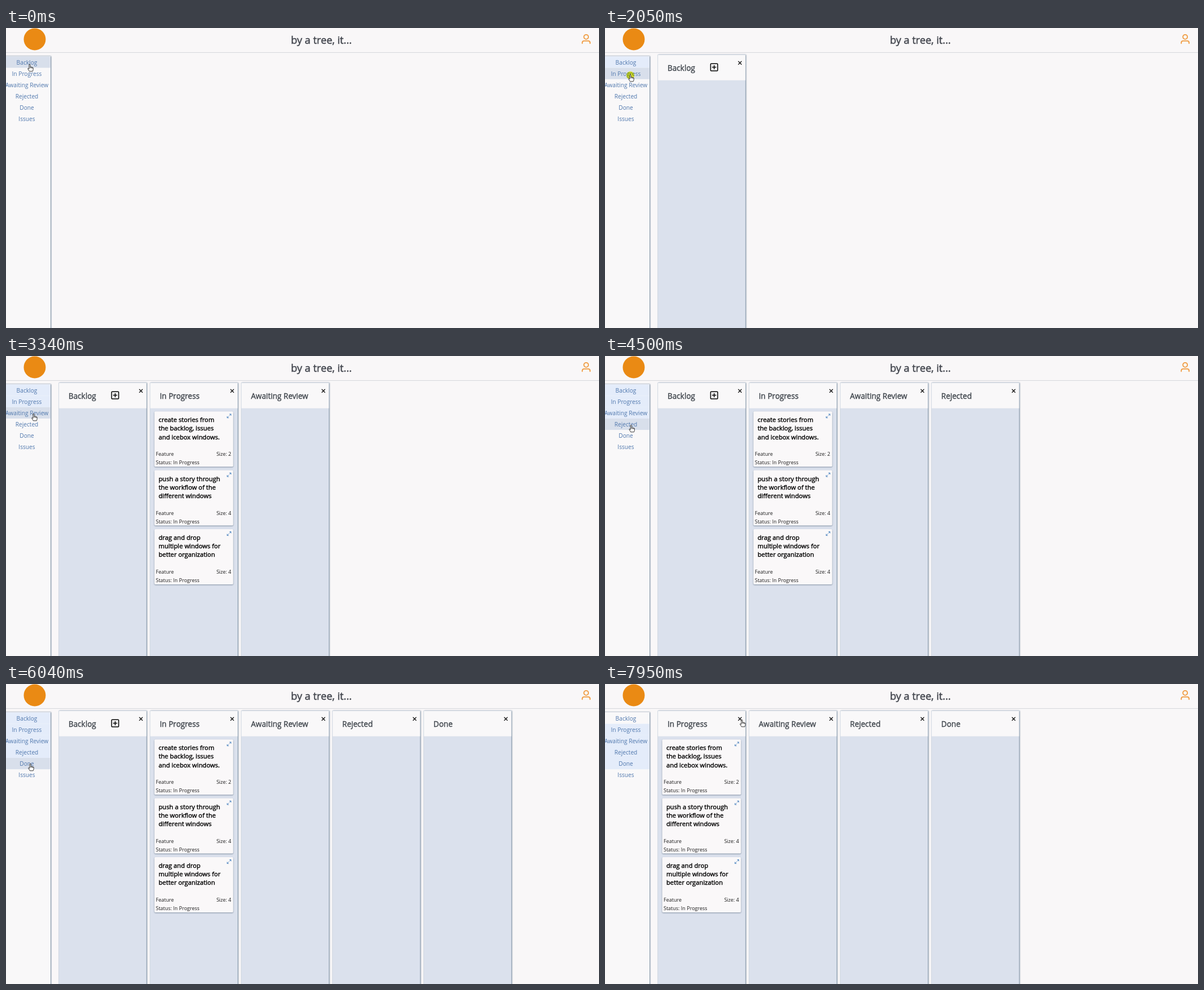
Write an HTML page that moves like this. It is 1053 px wide and 532 px high and loops after 8000 ms.

```html
<!DOCTYPE html>
<html lang="en">
<head>
<meta charset="utf-8">
<title>Story board</title>
<style>
  html, body { margin: 0; width: 100%; height: 100%; overflow: hidden; background: #f9f7f8; }
  svg { display: block; width: 1053px; height: 532px; font-family: "Open Sans", "Noto Sans", sans-serif; }
  .nav { font-size: 10.2px; fill: #4f77ad; text-anchor: middle; }
  .title { font-size: 18.2px; fill: #454850; stroke: #454850; stroke-width: .55; text-anchor: middle; }
  .heading { font-size: 13.6px; fill: #41474e; stroke: #41474e; stroke-width: .4; }
  .story { font-size: 11.22px; stroke: #000; stroke-width: .4; }
  .meta { font-size: 9px; fill: #1c1c1c; }
  .end { text-anchor: end; }
  .panel { filter: drop-shadow(1px 0 .8px #60788f); }
  .card { fill: #faf8f9; filter: drop-shadow(.5px 1px .8px #8290a2); }
  .line { fill: none; stroke-linecap: round; stroke-linejoin: round; }
</style>
</head>
<body>
<svg id="stage" viewBox="0 0 1053 532"></svg>
<script>
const LOOP = 8000, STEP = 70, ROW = 20.16, PITCH = 162;
const stage = document.getElementById('stage');

function add(parent, tag, attrs, text) {
  const node = document.createElementNS('http://www.w3.org/2000/svg', tag);
  for (const key in attrs) node.setAttribute(key, attrs[key]);
  if (text) node.textContent = text;
  parent.appendChild(node);
  return node;
}
const rect = (parent, x, y, width, height, fill, more) =>
  add(parent, 'rect', { x, y, width, height, fill, ...more });
const label = (parent, x, y, cls, text) => add(parent, 'text', { x, y, class: cls }, text);
const line = (parent, d, stroke, width) =>
  add(parent, 'path', { d, stroke, 'stroke-width': width, class: 'line' });

// Open and close times of each column
const columns = [
  { name: 'Backlog', open: 1220, close: 7740 },
  { name: 'In Progress', open: 2120 },
  { name: 'Awaiting Review', open: 3340 },
  { name: 'Rejected', open: 4290 },
  { name: 'Done', open: 5960 },
  { name: 'Issues', open: Infinity }
];
const stories = [
  [2, 'create stories from', 'the backlog, issues', 'and icebox windows.'],
  [4, 'push a story through', 'the workflow of the', 'different windows'],
  [4, 'drag and drop', 'multiple windows for', 'better organization']
];
const clicks = [1150, 2050, 3270, 4220, 5880, 7670];

// Pointer tip: time, x, y
const path = [
  [0, 42, 64], [1220, 42, 64], [1780, 45, 82], [2320, 45, 82], [2810, 49, 102],
  [3539, 49, 102], [3540, 50, 102], [3730, 50, 102], [4150, 44, 122],
  [4290, 44, 122], [4570, 47, 122], [4850, 65, 130], [5120, 60, 138],
  [5390, 60, 139], [5630, 103, 131], [5880, 43, 141], [6040, 43, 141],
  [6230, 62, 130], [7050, 244, 60], [7120, 244, 61], [7340, 243, 63], [LOOP, 243, 63]
];

function drawHeader() {
  line(stage, 'M0 43.5H1053', '#d6d7dc', 1);
  add(stage, 'circle', { cx: 51, cy: 20, r: 19.5, fill: '#ea8a14' });
  label(stage, 560, 28, 'title', 'by a tree, it...');
  add(stage, 'circle', { cx: 1030.2, cy: 15.8, r: 4, class: 'line', stroke: '#f09a3e', 'stroke-width': 1.8 });
  line(stage, 'M1023.3 27.3v-1.2q0-3.2 3.4-3.2h7q3.4 0 3.4 3.2v1.2', '#f09a3e', 1.8);
}

function drawNav() {
  rect(stage, -5, 50, 84, 500, '#f9f8f9', { class: 'panel' });
  columns.forEach((column, i) => {
    column.row = rect(stage, 0, 50.4 + i * ROW, 78.6, ROW, 'none');
    label(stage, 37, 64.5 + i * ROW, 'nav', column.name);
  });
}

function drawCard(parent, [size, ...lines], y) {
  rect(parent, 169.5, y, 140, 98, '', { class: 'card', rx: 2 });
  lines.forEach((text, i) => label(parent, 177, y + 19 + i * 15.1, 'story', text));
  label(parent, 172, y + 79, 'meta', 'Feature');
  label(parent, 306, y + 79, 'meta end', 'Size: ' + size);
  label(parent, 172, y + 94, 'meta', 'Status: In Progress');
  line(parent, `M302.8 ${y + 7.3}l2.6-2.6m-2.3 0h2.4v2.4M301.4 ${y + 8.7}l-2.6 2.6m0-2.3v2.4h2.4`, '#4f86c0', 1);
}

function drawColumn(column, i) {
  const group = column.group = add(stage, 'g', {});
  const x = 94;
  rect(group, x, 47.5, 155.3, 500, '#dbe1ed', { class: 'panel' });
  rect(group, x, 47.5, 155.3, 45.2, '#f9f8f9');
  line(group, `M${x - .3} 540V47.5H${x + 155}`, '#c9d3de', .8);
  label(group, x + 17, 76, 'heading', column.name);
  line(group, 'M237 59.2l5.2 5.2m0-5.2l-5.2 5.2', '#1a1a1a', 1.4);
  if (i === 0) {
    rect(group, 187.5, 63.3, 12.6, 12.6, 'none', { rx: 1.2, stroke: '#000', 'stroke-width': 1.5 });
    line(group, 'M190.6 69.6h6.4m-3.2-3.2v6.4', '#000', 1.5);
  }
  if (i === 1) {
    const cards = add(group, 'g', { transform: 'translate(-68 0)' });
    stories.forEach((story, k) => drawCard(cards, story, 98.3 + k * 104.3));
  }
}

drawHeader();
drawNav();
columns.slice(0, 5).forEach(drawColumn);
const glow = add(stage, 'circle', { r: 7, fill: '#ffff30', style: 'mix-blend-mode:multiply' });
const hand = add(stage, 'path', {
  d: 'M-1 1Q0-.6 1 1V5.2Q2.3 4.4 3 5.5Q4.2 4.8 4.8 6Q6 5.5 6.2 7V9.4Q6.2 11 5.2 12.8H-.6Q-1.2 11.3-3 8.9Q-3.7 7.4-2.4 7.4L-1 8.6ZM1 5.2V7.3M3 5.5V7.5M4.8 6V7.7',
  fill: '#fff', stroke: '#222', 'stroke-width': .9, 'stroke-linejoin': 'round'
});

function pointerAt(t) {
  const i = path.findIndex(point => point[0] > t);
  const [t0, x0, y0] = path[i - 1], [t1, x1, y1] = path[i];
  const held = Math.floor((t - t0) / STEP) * STEP;
  const k = held / (t1 - t0);
  return [x0 + (x1 - x0) * k, y0 + (y1 - y0) * k];
}

function render(t) {
  const [x, y] = pointerAt(t);
  const hovered = x < 79 ? Math.floor((y - 50.4) / ROW) : -1;
  let slot = 0;
  columns.forEach((column, i) => {
    const open = t >= column.open && t < (column.close || LOOP);
    column.row.setAttribute('fill', i === hovered ? '#d8dfeb' : open ? '#e4ecfa' : 'none');
    if (!column.group) return;
    column.group.style.display = open ? '' : 'none';
    if (open) column.group.setAttribute('transform', `translate(${PITCH * slot++} 0)`);
  });
  glow.setAttribute('transform', `translate(${x} ${y + 2})`);
  glow.style.display = clicks.some(c => t >= c && t < c + STEP) ? '' : 'none';
  hand.setAttribute('transform', `translate(${x} ${y})`);
}

const start = performance.now();
function tick() {
  render((performance.now() - start) % LOOP);
  requestAnimationFrame(tick);
}
tick();
</script>
</body>
</html>
```
